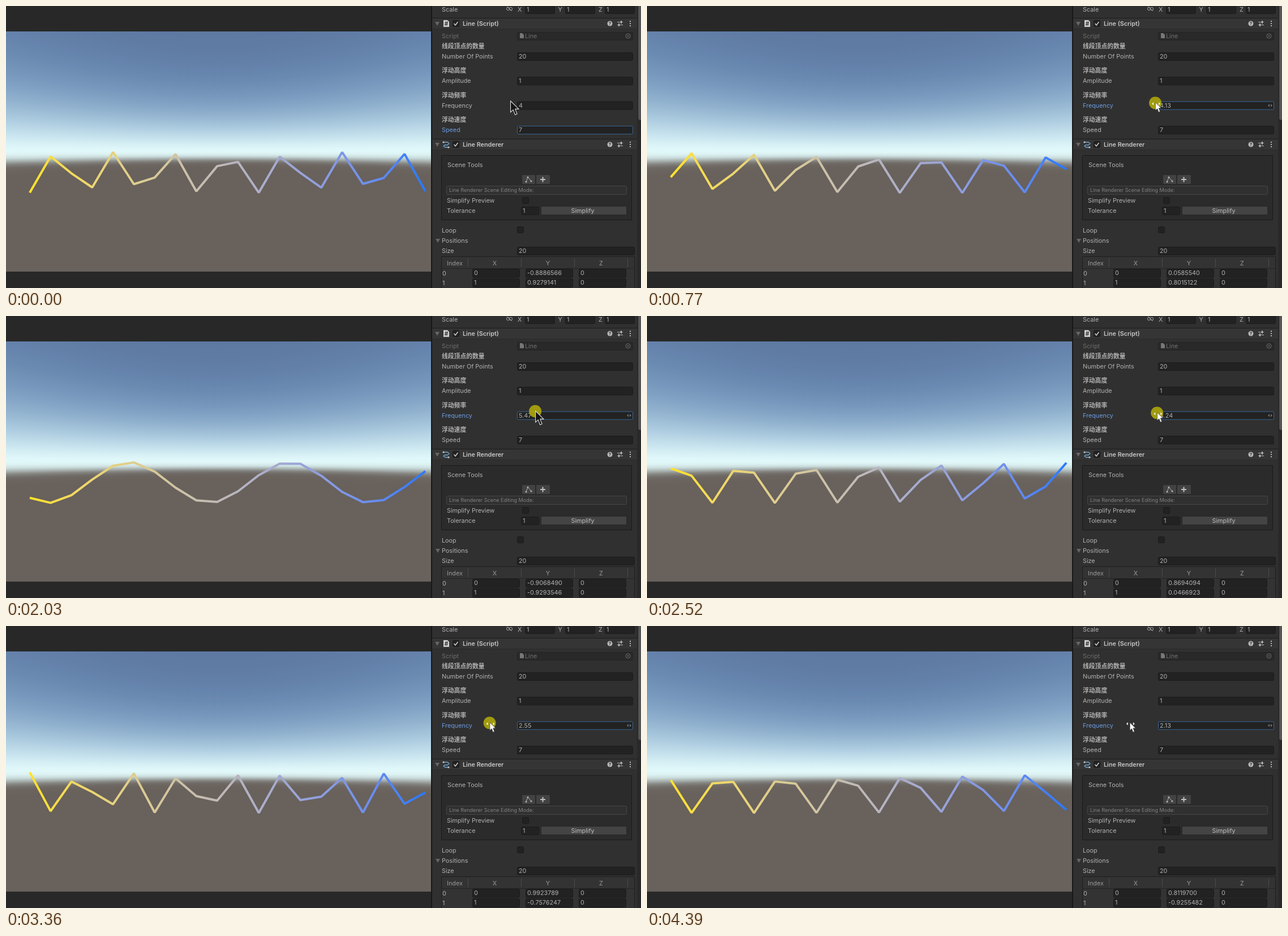
An HTML page with a canvas that plays this animation: 1122x499 px, repeating every 4.46 s.

```html
<!DOCTYPE html>
<html lang="en">
<head>
<meta charset="utf-8">
<title>Line wave inspector</title>
<style>
html, body { margin: 0; width: 100%; height: 100%; overflow: hidden; background: #282828; }
canvas { display: block; }
</style>
</head>
<body>
<canvas id="stage" width="1122" height="499"></canvas>
<script>
const W = 1122, H = 499, LOOP = 4460, TICKS = 64;
const VIEW = { w: 751, top: 45, bottom: 470 };
const ctx = document.getElementById('stage').getContext('2d');
const FONT = 'Inter, "Noto Sans CJK SC", "Noto Sans CJK", sans-serif';
const TEXT = '#b2b2b2', DIM = '#6e6e6e', BLUE = '#6b9be0', PANEL = '#303030';

// Key points as [tick, value]
const phaseKeys = [[0, 4.526], [21, 14.32], [42, 23.99], [55, 30.23], [63, 33.9]];
const freqKeys = [[9, 4], [11, 4.13], [21, 6.03], [29, 5.47], [42, 3.19], [52, 2.13]];
const HOVER = 4, PRESS = 9, RELEASE = 53, REST = 55;
const REPAINT_LAG = 0.29; // the inspector shows the previous step of the wave

function sample(keys, tick) {
  const last = keys[keys.length - 1];
  if (tick <= keys[0][0]) return keys[0][1];
  if (tick >= last[0]) return last[1];
  const i = keys.findIndex(k => k[0] > tick);
  const [t0, v0] = keys[i - 1], [t1, v1] = keys[i];
  return v0 + (v1 - v0) * (tick - t0) / (t1 - t0);
}

const wave = (freq, phase) => Array.from({ length: 20 }, (_, i) => Math.sin(i * freq + phase));

// The dragged value follows the pointer; before and after it only drifts
function pointerX(freq, tick) {
  const approach = 3.5 * Math.max(0, 1 - tick / PRESS);
  const drift = 1.25 * Math.max(0, tick - REST);
  return 894.5 + (freq - 4) / 0.0362 - approach + drift;
}

function text(str, x, y, opt = {}) {
  ctx.font = `${opt.weight || 400} ${opt.size || 10.8}px ${FONT}`;
  ctx.textAlign = opt.align || 'left';
  ctx.fillStyle = opt.color || TEXT;
  ctx.fillText(str, x, y + 4);
}

function rect(x, y, w, h, color) {
  ctx.fillStyle = color;
  ctx.fillRect(x, y, w, h);
}

function box(x, y, w, h, fill, stroke, r = 2) {
  ctx.beginPath();
  ctx.roundRect(x + 0.5, y + 0.5, w - 1, h - 1, r);
  ctx.fillStyle = fill;
  ctx.fill();
  ctx.strokeStyle = stroke;
  ctx.lineWidth = 1;
  ctx.stroke();
}

function path(points, color, width = 1) {
  ctx.beginPath();
  points.forEach(([x, y]) => ctx.lineTo(x, y));
  ctx.strokeStyle = color;
  ctx.lineWidth = width;
  ctx.stroke();
}

function shape(points, fill, stroke, width = 1) {
  ctx.beginPath();
  points.forEach(([x, y]) => ctx.lineTo(x, y));
  ctx.closePath();
  ctx.fillStyle = fill;
  ctx.fill();
  if (!stroke) return;
  ctx.strokeStyle = stroke;
  ctx.lineWidth = width;
  ctx.stroke();
}

function disc(x, y, r, color) {
  ctx.beginPath();
  ctx.arc(x, y, r, 0, 7);
  ctx.fillStyle = color;
  ctx.fill();
}

function ring(x, y, r, color) {
  ctx.beginPath();
  ctx.arc(x, y, r, 0, 7);
  ctx.strokeStyle = color;
  ctx.lineWidth = 1;
  ctx.stroke();
}

// Two small triangles pointing away from x
function sideArrows(x, y, gap, color) {
  for (const s of [-1, 1]) {
    const base = x + s * gap;
    shape([[base + s * 3, y], [base, y - 2.7], [base, y + 2.7]], color);
  }
}

function field(str, x, y, w, focus = false, h = 15) {
  box(x, y - 7, w, h, '#222222', focus ? '#386697' : '#1b1b1b');
  text(str, x + 3, y);
}

function check(x, y, on) {
  box(x, y - 6, 12, 12, '#222222', '#1a1a1a');
  if (on) path([[x + 2.5, y], [x + 5, y + 3], [x + 9.5, y - 3]], '#c8c8c8', 1.6);
}

function foldout(x, y) {
  shape([[x - 4, y - 3], [x + 4, y - 3], [x, y + 4]], '#666666');
}

function pageIcon(x, y, w, h, color) {
  shape([[x, y], [x + w - 3, y], [x + w, y + 3], [x + w, y + h], [x, y + h]], color);
}

function header(name, y) {
  const icon = '#b8b8b8';
  rect(753, y - 9, 362, 18, '#353535');
  rect(753, y - 10, 362, 1, '#1c1c1c');
  rect(753, y + 9, 362, 1, '#2b2b2b');
  foldout(762, y);
  check(789, y, true);
  text(name, 807, y, { weight: 600, color: '#c6c6c6' });
  disc(1067, y, 4.5, icon);
  text('?', 1067, y - 1, { size: 8, weight: 700, align: 'center', color: '#353535' });
  for (const s of [0, 1]) {
    rect(1080, y - 3 + 5 * s, 10, 1, icon);
    rect(1086 - 4 * s, y - 5 + 5 * s, 2, 5, icon);
  }
  for (const d of [-4, 0, 4]) rect(1102, y + d - 1, 2, 2, icon);
}

const mix = (a, b, w) => a + (b - a) * w;
const ZENITH = [92, 117, 156], HAZE = [227, 250, 251], GROUND = [104, 97, 92];
const REACH = [68, 78, 92]; // how far the haze climbs in red, green and blue

// Colour at d pixels above the horizon, measured on the middle column
function skyColor(d) {
  const ground = 1 / (1 + Math.exp((d + 12.5) / 3));
  return ZENITH.map((z, i) => {
    const haze = Math.exp(-((Math.max(0, d) / REACH[i]) ** 1.3));
    return Math.round(mix(mix(z, HAZE[i], haze), GROUND[i], ground));
  });
}

// Perspective view of the sky with a 60 degree field of view
function makeSky() {
  const canvas = document.createElement('canvas');
  canvas.width = VIEW.w;
  canvas.height = VIEW.bottom;
  const c = canvas.getContext('2d');
  const mid = (VIEW.top + VIEW.bottom) / 2, half = mid - VIEW.top;
  const focal = half / Math.tan(Math.PI / 6), steps = 106;
  const colors = Array.from({ length: steps + 1 }, (_, i) => `rgb(${skyColor(half * (1 - 2 * i / steps))})`);
  for (let x = 0; x < VIEW.w; x++) {
    const reach = half * Math.hypot(x - VIEW.w / 2, focal) / focal;
    const g = c.createLinearGradient(0, mid - reach, 0, mid + reach);
    colors.forEach((color, i) => g.addColorStop(i / steps, color));
    c.fillStyle = g;
    c.fillRect(x, VIEW.top, 1, VIEW.bottom - VIEW.top);
  }
  return canvas;
}

// Yellow to blue, blended in linear light
function makeLineColor() {
  const a = [255, 226, 40], b = [40, 121, 255];
  const g = ctx.createLinearGradient(42, 0, 741, 0);
  for (let k = 0; k <= 1; k += 0.125) {
    const rgb = a.map((v, j) => Math.round(mix(v ** 2.2, b[j] ** 2.2, k) ** (1 / 2.2)));
    g.addColorStop(k, `rgb(${rgb})`);
  }
  return g;
}

const sky = makeSky(), lineColor = makeLineColor();

function drawView(heights) {
  rect(0, 0, VIEW.w, H, '#282828');
  ctx.drawImage(sky, 0, 0);
  ctx.lineJoin = 'bevel';
  path(heights.map((h, i) => [42 + i * 36.79, 294.6 - 36.2 * h]), lineColor, 4);
  ctx.lineJoin = 'miter';
}

function drawScript(freq, tick) {
  const link = '#a0a0a0';
  text('Scale', 770, 6);
  ring(887, 5, 2.6, link);
  ring(892, 5, 2.6, link);
  path([[885, 1], [894, 9]], link);
  ['X', 'Y', 'Z'].forEach((name, i) => {
    text(name, 904 + 71.5 * i, 6);
    field('1', Math.round(917 + 70.7 * i), 6, 53);
  });

  header('Line (Script)', 31);
  pageIcon(773, 25, 10, 12, '#d0d0d0');
  text('#', 778, 31, { size: 10, weight: 700, align: 'center', color: '#333333' });

  text('Script', 770, 53, { color: DIM });
  box(903, 46, 205, 15, '#292929', '#232323');
  pageIcon(908, 48, 7, 9, '#777777');
  text('Line', 917, 53, { color: DIM });
  ring(1099, 53, 4, DIM);
  disc(1099, 53, 1.3, DIM);

  const focused = tick >= PRESS ? 'Frequency' : 'Speed';
  const rows = [
    ['线段顶点的数量', 'Number Of Points', 20],
    ['浮动高度', 'Amplitude', 1],
    ['浮动频率', 'Frequency', +freq.toFixed(2)],
    ['浮动速度', 'Speed', 7]
  ];
  rows.forEach(([title, name, value], i) => {
    const y = 89 + 43.35 * i, focus = name === focused;
    text(title, 770, y - 18, { weight: 700 });
    text(name, 770, y, { color: focus ? BLUE : TEXT });
    field(value, 903, y, 205, focus);
  });
  if (tick >= HOVER) sideArrows(1101, 176, 1, '#707070');
}

function drawRenderer(heights) {
  header('Line Renderer', 245);
  path([[773, 241], [780, 241], [783, 243.5], [780, 246], [775, 246], [773, 248], [776, 250], [782, 250]], '#6fa6cf', 1.3);
  disc(773, 241, 1.6, '#c4c4c4');
  disc(782, 250, 1.6, '#c4c4c4');

  box(769, 264, 337, 115, '#2b2b2b', '#1a1a1a', 0);
  text('Scene Tools', 780, 281);
  box(911, 298, 25, 18, '#424242', '#292929');
  box(936, 298, 26, 18, '#424242', '#292929');
  const nodes = [[919, 311], [922, 303], [928, 310]];
  path(nodes, '#b0b0b0');
  nodes.forEach(([x, y]) => disc(x, y, 1.6, '#b0b0b0'));
  rect(944, 306, 9, 2, '#c0c0c0');
  rect(947.5, 302.5, 2, 9, '#c0c0c0');
  box(778, 318, 319, 16, '#303030', '#474747');
  text('Line Renderer Scene Editing Mode:', 783, 325, { size: 9, color: '#828282' });
  text('Simplify Preview', 779, 344);
  check(912, 344);
  text('Tolerance', 779, 362);
  field('1', 910, 362, 32);
  box(945, 354, 152, 16, '#444444', '#292929');
  text('Simplify', 1019, 361.5, { align: 'center', color: '#c0c0c0' });

  text('Loop', 770, 397);
  check(903, 396);
  foldout(763, 415);
  text('Positions', 770, 415);
  text('Size', 770, 433);
  field('20', 903, 433, 208);

  const head = { align: 'center', color: '#999999' };
  box(769, 443, 342, 70, '#333333', '#1e1e1e', 0);
  text('Index', 793, 455, head);
  ['X', 'Y', 'Z'].forEach((name, i) => text(name, 863.5 + 94 * i, 455, head));
  for (let i = 0; i < 4; i++) rect(816 + 94 * i, 447, 1, 15, '#4c4c4c');
  rect(770, 464, 340, 1, '#252525');
  for (let i = 0; i < 2; i++) {
    const y = 472.5 + 17 * i;
    text(i, 771, y);
    [i, heights[i].toFixed(7), 0].forEach((v, j) => field(v, 824 + 94 * j, y - 0.5, 84, false, 16));
  }
}

function drawPointer(x, tick) {
  const plain = tick < HOVER || x >= 903;
  const y = plain ? 168 : 171, k = plain ? 1 : 0.68;
  if (tick >= PRESS && tick < RELEASE) disc(x, y + 0.5, 11, 'rgba(168,161,14,0.94)');
  const arrow = [[0, 0], [0, 20], [4.7, 15.6], [8, 24.5], [11.5, 23], [8.2, 14.4], [14.4, 14.4]]
    .map(([px, py]) => [x + 0.5 + px * k, y + py * k]);
  if (plain) {
    shape(arrow, '#141414', '#dedede', 1.1);
  } else {
    shape(arrow, '#ffffff', '#444444', 0.6);
    sideArrows(x + 1.5, y + 2, 4.5, '#f0f0e0');
  }
}

function draw(now) {
  const tick = Math.min(TICKS - 1, Math.floor((now % LOOP + 5) / LOOP * TICKS));
  const phase = sample(phaseKeys, tick), freq = sample(freqKeys, tick);

  drawView(wave(freq, phase));
  rect(VIEW.w, 0, 2, H, '#181818');
  rect(753, 0, W - 753, H, PANEL);
  drawScript(freq, tick);
  drawRenderer(wave(freq, phase - REPAINT_LAG));
  rect(1115, 0, 7, H, '#292929');
  box(1117, -4, 7, 206, '#565656', '#4c4c4c', 3);
  drawPointer(pointerX(freq, tick), tick);
}

let start;
function loop(now) {
  start ??= now;
  draw(Math.max(0, now - start));
  requestAnimationFrame(loop);
}
draw(0);
requestAnimationFrame(loop);
</script>
</body>
</html>
```
